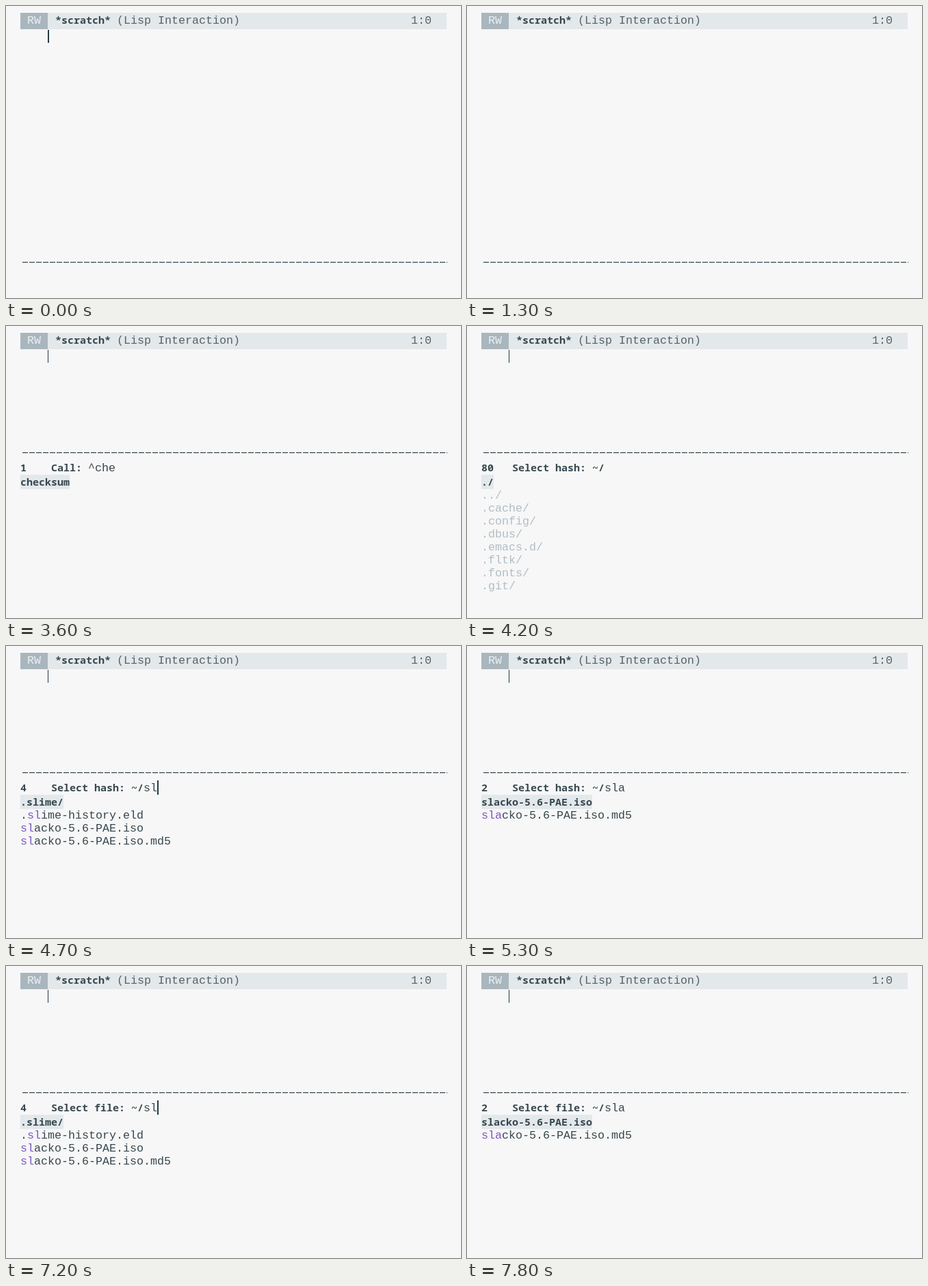
Write an HTML page that moves like this. It is 665 by 428 pixels and loops after 8 s.

```html
<!DOCTYPE html>
<html lang="en">
<head>
<meta charset="utf-8">
<title>Minibuffer completion</title>
<style>
  html, body { margin: 0; width: 100%; height: 100%; overflow: hidden; background: #f7f7f7; }
  svg { display: block; width: 665px; height: 428px; }
  text { font: 400 16.667px "Liberation Mono", monospace; fill: #37474f; white-space: pre; }
  text.bold { font: 600 15px "Noto Sans Mono", monospace; }
  text.mode { fill: #566369; }
  text.tag { fill: #eceff1; }
  text.dir { fill: #b0bec5; }
  .match { fill: #7e57c2; }
  .bar { fill: #e3e8eb; }
  .caret { fill: #263a46; }
</style>
</head>
<body>
<svg viewBox="0 0 665 428">
  <rect width="665" height="428" fill="#f7f7f7"/>
  <rect class="bar" x="21" y="10" width="623" height="24"/>
  <rect x="21" y="10" width="40" height="24" fill="#a9b6be"/>
  <text class="tag" x="31" y="26">RW</text>
  <text class="bold" x="72" y="26">*scratch*</text>
  <text class="mode" x="162" y="26">(Lisp Interaction)</text>
  <text class="mode" x="592" y="26">1:0</text>
  <g id="live"></g>
</svg>
<script>
const LOOP = 8000, BLINK = 500, LEFT = 21;
const BOLD = 9, PLAIN = 10; // character advances

const calls = ["Dashboard", "New Scratch", "Shell", "Eshell", "Deft", "Magit", "rss", "Slime", "rmail"];
const home = ["./", "../", ".cache/", ".config/", ".dbus/", ".emacs.d/", ".fltk/", ".fonts/", ".git/"];
const isos = ["slacko-5.6-PAE.iso", "slacko-5.6-PAE.iso.md5"];
const sl = [".slime/", ".slime-history.eld", ...isos];
const s = [".dbus/", ".emacs.d/", ".fonts/", ...sl];
const check = ["checksum"];

const call = (at, query, items, count = items.length) =>
  ({ at, label: "Call: ", query, items, count, pick: 0 });
const file = (at, kind, query, items, count = items.length, pick = 0) =>
  ({ at, label: `Select ${kind}: ~/`, query, items, count, pick });

// Every step is a key press, which also restarts the caret blink.
const steps = [
  { at: -200 },
  { at: 1700, echo: "C-c-" },
  call(1800, "^", calls, 11),
  call(2900, "^c", check),
  call(3000, "^ch", check),
  call(3100, "^che", check),
  file(3700, "hash", "", home, 80),
  file(4600, "hash", "s", s),
  file(4700, "hash", "sl", sl),
  file(4800, "hash", "sla", isos),
  file(5500, "hash", "sla", isos, 2, 1),
  file(6400, "file", "", home, 80),
  file(7100, "file", "s", s),
  file(7200, "file", "sl", sl),
  file(7300, "file", "sla", isos),
];

const live = document.getElementById("live");
const text = (x, y, body, cls = "") => `<text class="${cls}" x="${x}" y="${y}">${body}</text>`;
const rect = (cls, x, y, w, h) => `<rect class="${cls}" x="${x}" y="${y}" width="${w}" height="${h}"/>`;
const divider = y =>
  `<path d="M24 ${y}H645" stroke="#37474f" stroke-width="1.2" stroke-dasharray="8 2"/>`;
const mark = (item, query) =>
  query ? item.replace(query, `<tspan class="match">${query}</tspan>`) : item;

function list({ items, pick, query }) {
  let y = 218;
  return items.map((item, i) => {
    const top = y;
    if (i === pick) {
      y += 21;
      return rect("bar", LEFT, top, item.length * BOLD, 21) + text(LEFT, top + 16, item, "bold");
    }
    y += 19;
    return text(LEFT, top + 14, mark(item, query), item.endsWith("/") ? "dir" : "");
  }).join("");
}

function view(step, lit) {
  if (!step.label) {
    return divider(375.6) + (lit ? rect("caret", 61, 35, 2, 19) : "") +
      (step.echo ? text(LEFT, 401, step.echo) : "");
  }
  const prompt = String(step.count).padEnd(5) + step.label;
  const x = LEFT + prompt.length * BOLD;
  return rect("caret", 61, 35, 1, 19) + divider(185.6) +
    text(LEFT, 213, prompt, "bold") + text(x, 213, step.query) +
    (lit ? rect("caret", x + step.query.length * PLAIN, 197, 2, 21) : "") +
    list(step);
}

let shown = "";
function draw(now) {
  const t = now % LOOP;
  const step = steps.findLast(k => k.at <= t);
  const lit = Math.floor((t - step.at) / BLINK) % 2 === 0;
  const next = view(step, lit);
  if (next !== shown) live.innerHTML = shown = next;
}

const start = performance.now();
function tick() {
  draw(performance.now() - start);
  requestAnimationFrame(tick);
}
tick();
</script>
</body>
</html>
```
